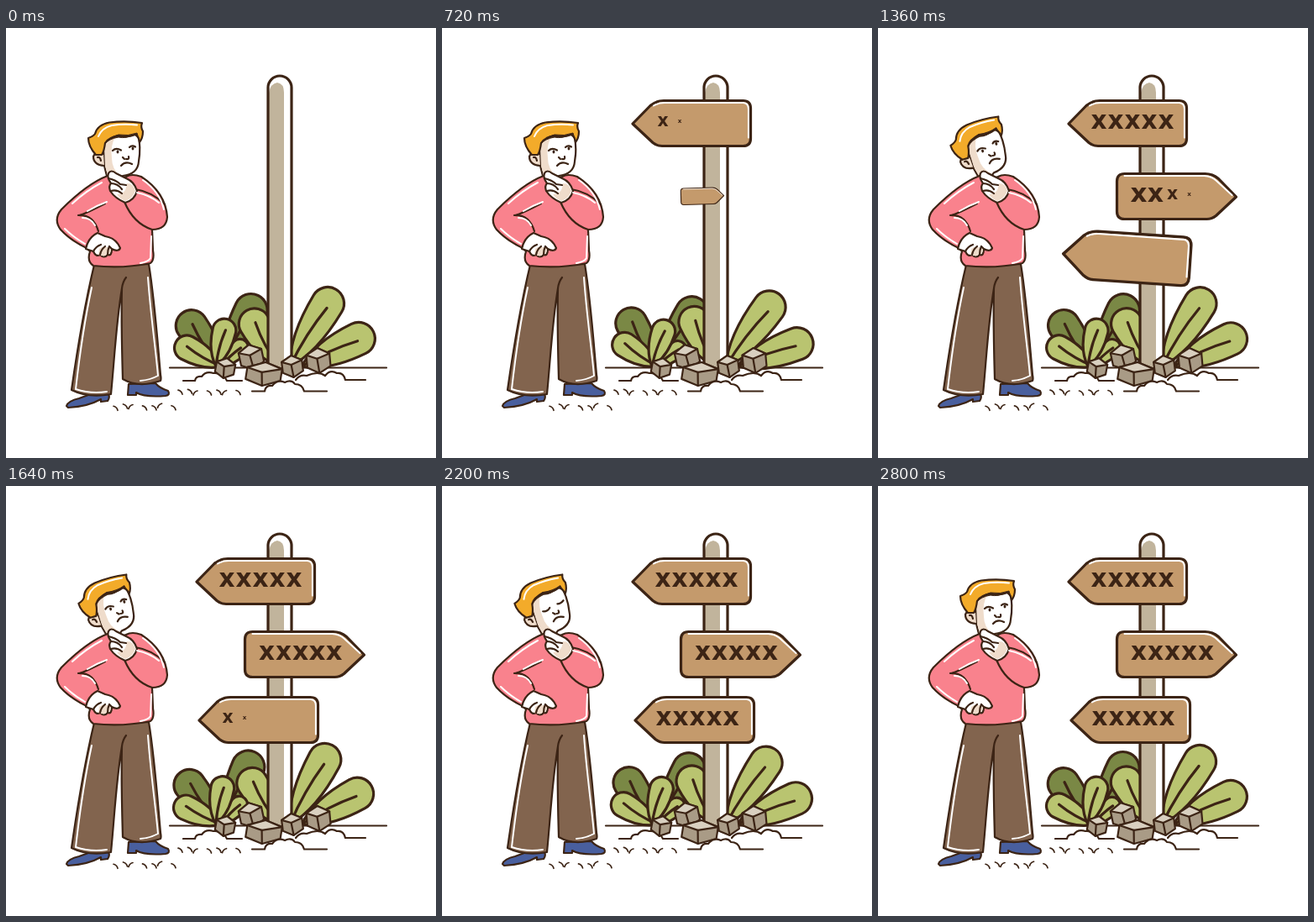
These frames come from a looping animation (512x512 px, 2.88 s). An HTML page:

```html
<!DOCTYPE html>
<html lang="en">
<head>
<meta charset="utf-8">
<title>Signpost</title>
<style>
html, body { margin: 0; width: 100%; height: 100%; overflow: hidden; background: #fff; }
svg { display: block; width: 100vw; height: 100vh; }
.ink { stroke: #3c2415; stroke-width: 2.2; stroke-linecap: round; stroke-linejoin: round; }
.bold { stroke-width: 3.2; }
.line { fill: none; }
.shine { fill: none; stroke: #fff; stroke-width: 2; stroke-linecap: round; stroke-linejoin: round; }
text { font: bold 29.5px "DejaVu Sans", sans-serif; fill: #3c2415; text-anchor: middle; }
</style>
</head>
<body>
<svg viewBox="0 0 512 512">
  <path class="ink line" d="M195 404.500H453"/>
  <g id="plants"></g>

  <g class="ink">
    <path d="M312 404V71a14 14 0 0 1 28 0V404Z" fill="#fff" stroke="none"/>
    <path d="M313 404V77Q315 66 323 65Q331 66 331 77V404Z" fill="#c1b49c" stroke="none"/>
    <path class="line bold" d="M312 404V71a14 14 0 0 1 28 0V404"/>
  </g>

  <g class="ink" fill="#fff">
    <path d="M211 420H225Q226 414 233 415Q238 408 247 411Q258 410 263 420H281"/>
    <path d="M345 419Q350 412 358 414Q372 408 380 414Q386 406 394 411Q402 410 404 419H428"/>
  </g>
  <g id="rocks"></g>
  <path class="ink" fill="#fff" d="M293 432.500H308Q309 425 317 426Q323 418 332 422Q340 418 344 424Q353 424 355 432.500H382"/>
  <path id="grass" class="ink line" style="stroke-width:1.700"/>

  <g class="ink">
    <path fill="#495f9e" d="M72 450Q74 444 87 441L98 437L122 436Q124 440 121 444L113 445V442Q97 451 74 452Z"/>
    <path fill="#495f9e" d="M146 424L145 437H155V434Q165 440 190 438Q196 437 193 432Q183 429 178 423Z"/>
    <path fill="#82644e" d="M105 282C94 328 85 382 78 431Q98 441 125 436C129 396 131 352 138 310C137 350 138 382 139 418Q158 429 184 420Q185 418 184 413C180 368 177 324 170 281Z"/>
    <path class="line" d="M138 310Q139 302 143 297"/>
  </g>
  <path class="shine" d="M102 309C94 346 88 386 83 430Q101 436 120 433M169 297C172 340 178 380 181 414Q172 419 160 420"/>

  <g id="head" class="ink">
    <path fill="#fff" d="M116 130L117 164L121 180Q130 184 139 176Q157 174 158 159Q161 142 157 124Z"/>
    <path fill="#efdccb" stroke="none" d="M117 134L118 164L122 179Q130 181 136 176Q126 168 126 155Q124 140 130 130Z"/>
    <path fill="#efdccb" d="M116 150Q107 145 104 153Q104 163 117 164"/>
    <path class="line" d="M109 154Q112 153 113 158"/>
    <path fill="#f3ab2a" d="M107 151Q98 141 98 131Q104 129 106 126Q109 115 123 112.500Q142 110 162 113Q160 118 163 123Q163 131 159 136Q158 129 154 127Q144 131 134 128Q122 130 118 137Q117 146 114 151Z"/>
    <path d="M118 138Q122 130 134 127Q146 129 156 125L159 135Q157 128 152 127Q143 132 134 130Q122 132 118 138Z" fill="#3c2415" stroke-width="1"/>
    <path class="shine" d="M110 129Q114 119 126 116Q140 114 156 115.500"/>
    <g id="open" class="line">
      <path d="M127 146Q131 142 137 145.500M147 142Q150 139 154 141.500"/>
      <path d="M133 147V148M151 143V144" stroke-width="2.800"/>
    </g>
    <path id="shut" class="line" d="M128 149Q133 151 137 147M147 145Q151 146 155 143"/>
    <path class="line" d="M139 154L141 156M143 156Q147 157 146 153M137 164Q142 158 150 162"/>
  </g>

  <g class="ink">
    <path fill="#f9828d" d="M121 176C100 184 82 200 66 216Q56 228 65 240Q77 253 96 262L100 266Q96 278 104 283Q138 287 172 280Q177 276 175 265L174 240Q191 240 192 225Q190 196 161 177Q150 173 143 177Q132 182 121 176Z"/>
    <path class="line" d="M86 223Q104 222 110 242M88 223Q99 219 118 209M154 192Q174 195 189 210M141 207Q152 233 174 240"/>
    <path fill="#fff" d="M109 244Q98 249 95 263L104 266Q107 273 112 270Q117 275 121 270Q126 272 126 263Q134 267 136 262Q131 250 118 248Z"/>
    <path fill="#efdccb" stroke="none" d="M110 270Q118 273 120 269Q125 270 125 262Q115 259 111 263Z"/>
    <path class="line" d="M104 266Q107 260 113 258M112 270Q113 264 118 260M121 270Q121 264 123 260L126 263"/>
    <path fill="#fff" d="M142 208Q130 203 124 194Q122 188 125 185Q120 178 122 173Q125 168 131 173L143 179Q153 183 156 194Q153 205 142 208Z"/>
    <path fill="#efdccb" stroke="none" d="M142 206Q135 203 132 198Q143 198 144 185Q152 185 154 194Q151 203 142 206Z"/>
    <path class="line" d="M122 179Q131 181 136 186L143 187M125 185Q133 185 138 192M125 194Q132 192 138 197"/>
  </g>
  <path class="shine" d="M114 184Q95 194 79 209M97 218Q109 211 120 207M70 239Q80 249 94 257M91 226Q101 226 106 235M163 181Q183 195 188 216M156 196Q171 199 182 208M173 248L172 274Q170 278 160 280"/>

  <g id="signs"></g>
</svg>
<script>
const LOOP = 2880, STEP = 40;
const $ = id => document.getElementById(id);

function add(parent, tag, attrs) {
  const el = document.createElementNS('http://www.w3.org/2000/svg', tag);
  for (const k in attrs) el.setAttribute(k, attrs[k]);
  return parent.appendChild(el);
}

let seed = 7;
const random = () => (seed = seed * 16807 % 2147483647) / 2147483647;

// A round-tipped leaf growing from the ground line at x
const DARK = '#7a8845', LIGHT = '#b9c470';
function leaf(x, angle, len, fill) {
  const w = Math.min(19.5, len * .24), c = w - len;
  const g = add($('plants'), 'g', { class: 'ink' });
  add(g, 'path', {
    fill, class: 'bold',
    d: `M0 0C${-w * .6} ${-len * .17} ${-w} ${-len * .42} ${-w} ${c}A${w} ${w} 0 0 1 ${w} ${c}C${w} ${-len * .42} ${w * .6} ${-len * .17} 0 0Z`
  });
  add(g, 'path', { class: 'line bold', d: `M0 0Q${-w * .2} ${-len * .4} ${w * .1} ${-len * .77}` });
  return sway => g.setAttribute('transform', `translate(${x} 403) rotate(${angle + sway})`);
}
const leaves = [
  leaf(259, 26, 94, DARK), leaf(255, -35, 78, DARK),
  leaf(325, -30, 77, LIGHT), leaf(256, 45, 42, LIGHT),
  leaf(352, 64, 95, LIGHT), leaf(338, 31, 107, LIGHT),
  leaf(257, -62, 62, LIGHT), leaf(250, 13, 58, LIGHT)
];

// A squashed hexagon with three faces meeting inside
function rock(x, y, rx, ry) {
  const turn = (random() - .5) * .4;
  const p = [0, 1, 2, 3, 4, 5].map(i => {
    const a = (i * 2 - 5) * Math.PI / 6 + turn;
    return [x + rx * Math.cos(a), y + ry * Math.sin(a)];
  });
  const mid = [x - rx * .1, y - ry * .15];
  const g = add($('rocks'), 'g', { class: 'ink' });
  add(g, 'polygon', { points: p, fill: '#a99b86' });
  add(g, 'polygon', { points: [p[0], p[1], p[2], mid], fill: '#d9d0c0' });
  add(g, 'polyline', { points: [mid, p[4]] });
}
rock(292, 392, 16, 15);
rock(261, 405, 13, 12);
rock(372, 396, 16, 15);
rock(341, 403, 14, 13);
rock(307, 412, 24, 14);

// Two rows of short blades
const row = (x, y) => Array.from({ length: 7 }, (_, i) => {
  const lean = i % 3 == 2 ? -1 : 1;
  return `M${x + i * 11.5} ${y + random() * 4 - 2}q${4 * lean} 1 ${5 * lean} 5`;
}).join('');
$('grass').setAttribute('d', row(205, 431) + row(128, 449));

// A board with one pointed end, its shine and five letters
function sign(tip, back, top, textX, start, textStart) {
  const g = add($('signs'), 'g', {});
  const s = Math.sign(back - tip), y = top + 27.5, low = top + 54;
  const X = d => tip + s * d, B = d => back - s * d;
  add(g, 'path', {
    class: 'ink bold', fill: '#c49a6c',
    d: `M${tip} ${y}L${X(21)} ${top + 6}Q${X(28)} ${top} ${X(37)} ${top}H${B(9)}Q${back} ${top} ${back} ${top + 9}V${low - 9}Q${back} ${low} ${B(9)} ${low}H${X(35)}Q${X(29)} ${low} ${X(24)} ${low - 4}Z`
  });
  add(g, 'path', {
    class: 'shine',
    d: s > 0
      ? `M${X(25)} ${top + 6}Q${X(31)} ${top + 2.6} ${X(38)} ${top + 2.6}H${B(9)}Q${B(2.6)} ${top + 3} ${B(2.6)} ${top + 10}V${low - 10}`
      : `M${B(9)} ${top + 2.6}H${X(38)}Q${X(30)} ${top + 3} ${X(24)} ${top + 8}L${X(5)} ${y - 2}`
  });
  const letters = Array.from({ length: 5 }, () => {
    const el = add(g, 'text', { y: 8 });
    el.textContent = 'x';
    return el;
  });

  return t => {
    const [scale, turn] = pop(t - start);
    g.style.display = scale ? '' : 'none';
    g.setAttribute('transform', `translate(${back} ${y}) rotate(${s * turn}) scale(${scale}) translate(${-back} ${-y})`);
    letters.forEach((el, i) => {
      const k = grow(t - textStart - 80 * i);
      el.style.display = k ? '' : 'none';
      el.setAttribute('transform', `translate(${textX + 20 * i} ${top + 25}) scale(${k})`);
    });
  };
}
const signs = [
  sign(227, 367.5, 86.5, 263, 165, 596),
  sign(426.5, 284.5, 173.5, 310.5, 640, 1076),
  sign(230, 371.5, 251.5, 264, 1080, 1516)
];

const ease = p => (1 - Math.cos(Math.PI * p)) / 2;

function track(keys, t) {
  const i = keys.findIndex(k => t < k[0]);
  if (i < 1) return keys[i ? keys.length - 1 : 0][1];
  const [t0, a] = keys[i - 1], [t1, b] = keys[i];
  return a + (b - a) * ease((t - t0) / (t1 - t0));
}

// Board scale and turn: grow past full size, then settle
function pop(t) {
  if (t <= 0) return [0, 0];
  if (t < 240) return [1.08 * t / 240, 4.5 * t / 240];
  const left = 1 - ease(Math.min((t - 240) / 160, 1));
  return [1 + .08 * left, 4.5 * left];
}

function grow(t) {
  if (t < 180) return Math.max(t / 180, 0);
  return t < 420 ? 1 + .05 * Math.sin(Math.PI * (t - 180) / 240) : 1;
}

const SWAY = [[160, 0], [940, 6.3], [1640, -2.8], [2200, 2], [2800, 0]];
const TILT = [[840, 0], [1240, -15.5], [2420, -15.5], [2780, 0]];
const BLINKS = [480, 1520, 2220];

function draw(t) {
  const sway = track(SWAY, t);
  leaves.forEach(turn => turn(sway));
  signs.forEach(show => show(t));

  $('head').setAttribute('transform', `rotate(${track(TILT, t)} 125 178)`);
  const shut = BLINKS.some(b => Math.abs(t - b) < 60);
  $('open').style.display = shut ? 'none' : '';
  $('shut').style.display = shut ? '' : 'none';
}

const begin = performance.now();
function tick() {
  const t = (performance.now() - begin) % LOOP;
  draw(Math.floor(t / STEP) * STEP);
  requestAnimationFrame(tick);
}
tick();
</script>
</body>
</html>
```
